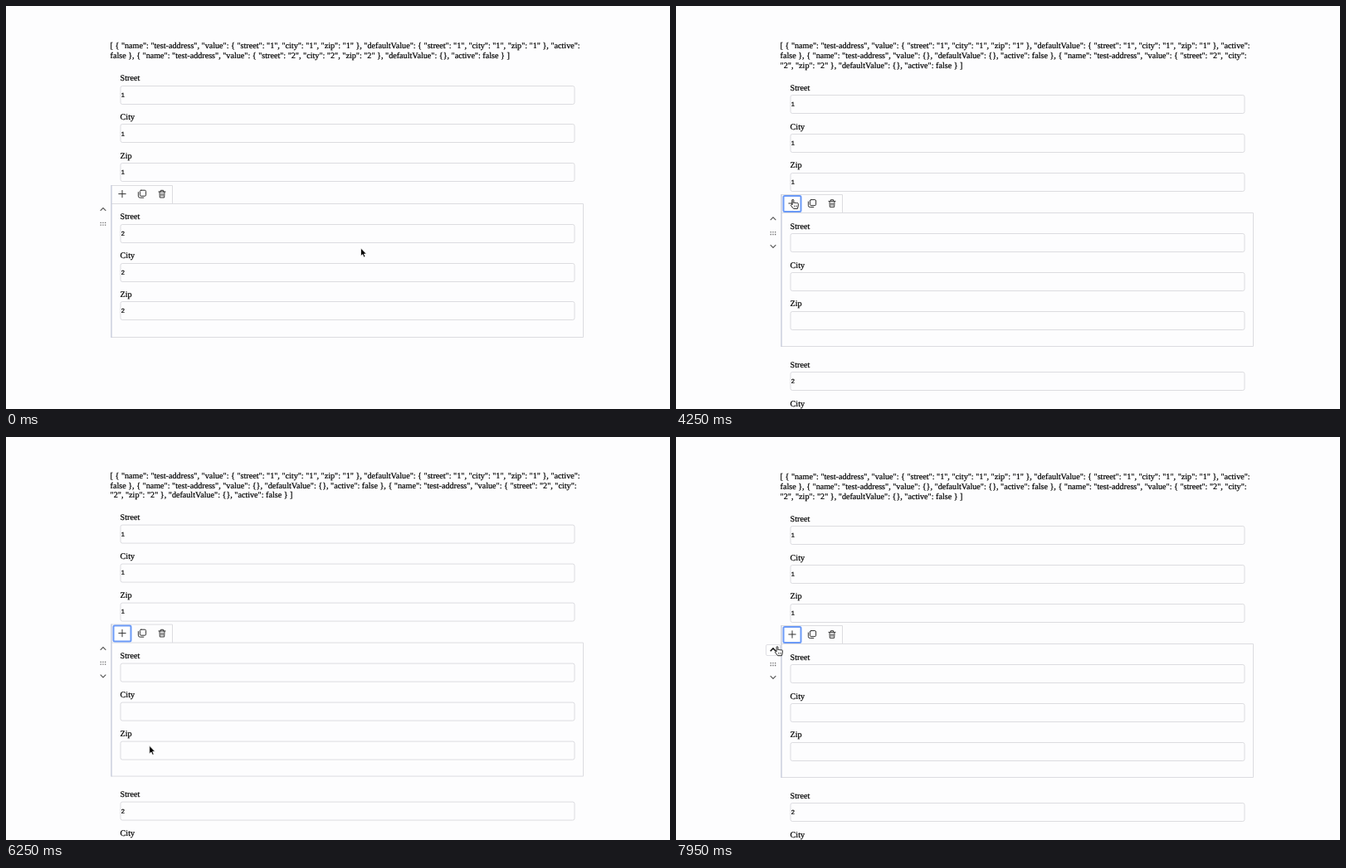
An HTML page for the animation above (8 s loop, 800 px wide and 486 px high).

```html
<!DOCTYPE html>
<html lang="en">
<head>
<meta charset="utf-8">
<title>Repeatable address form</title>
<style>
  html, body { margin: 0; width: 100%; height: 100%; overflow: hidden; background: #fdfdfe; }
  svg { display: block; width: 800px; height: 486px; }
  text { font: 10.13px "Liberation Serif", Times, serif; stroke: #000; stroke-width: .22; text-rendering: geometricPrecision; }
  .value { font: 7.5px "Liberation Sans", Arial, sans-serif; }
  .line { fill: none; stroke: #dcdce0; }
  .icon { fill: none; stroke: #333; stroke-linecap: round; stroke-linejoin: round; }
  .arrow { fill: none; stroke: #555; stroke-width: 1.1; }
  .arrow.lit { stroke: #111; stroke-width: 1.5; }
  .dots { stroke: #666; stroke-width: 1.3; stroke-dasharray: 1.3 1.4; }
  .hover { fill: #fff; stroke: #dfdfe4; }
  .focus { fill: #fff; stroke: #6b9af7; stroke-width: 2; }
</style>
</head>
<body>
<svg id="stage" viewBox="0 0 800 486"></svg>
<script>
const LOOP = 8000, STEP = 50, INSERT_AT = 3600;
const LINE_H = 11.4, FIELD_H = 46.8, BLOCK_H = 167.1;
const LEFT = 127, RIGHT = 695.5, HANDLE_X = 117;
const BUTTONS = { add: 140, copy: 164, remove: 188 };

const snap = v => Math.round(v) + 0.5;

// 0 to 1 between two times, with a soft start and end
function ramp(from, to, t) {
  const k = Math.min(1, Math.max(0, (t - from) / (to - from)));
  return k * (1 + 3 * k - 2 * k * k) / 2;
}

// Pointer glides: begin, end, and the place reached
const HOME = { x: 427.5, y: 292 };
const GLIDES = [
  { from: 50, to: 850, x: 189.5, y: 230 },
  { from: 950, to: 1150, x: 154.5, y: 230 },
  { from: 1400, to: 1550, x: 162, y: 230 },
  { from: 2300, to: 2500, x: 140, y: 229 },
  { from: 4220, to: 4800, x: 173, y: 379 },
  { from: 4800, to: 4900, x: 174, y: 364 },
  { from: 6200, to: 6400, x: 168, y: 405 },
  { from: 6400, to: 6700, x: 163, y: 273 },
  { from: 6850, to: 7300, x: 141, y: 236 },
  { from: 7500, to: 7700, x: 151, y: 254 },
  { from: 7700, to: 7950, x: 122, y: 252.7 }
];

function pointerAt(t) {
  let { x, y } = HOME;
  for (const g of GLIDES) {
    const k = ramp(g.from, g.to, t);
    x += (g.x - x) * k;
    y += (g.y - y) * k;
  }
  return { x, y };
}

const scrollAt = t => 2 * (ramp(5700, 5950, t) - ramp(6200, 6350, t));

function block(value, y) {
  return ["Street", "City", "Zip"].map((label, i) => {
    const top = y + i * FIELD_H;
    return `<text x="137.6" y="${top + 90.3}">${label}</text>
      <rect class="line" x="138" y="${snap(top + 95.6)}" width="547" height="22" rx="2.2"/>
      <text class="value" x="138.8" y="${top + 109.7}">${value}</text>`;
  }).join("");
}

function toolbar(y) {
  const at = (name, shape) => `<g class="icon" transform="translate(${BUTTONS[name]} ${y})">${shape}</g>`;
  return at("add", `<path d="M-4.2 0h8.4M0-4.2v8.4"/>`)
    + at("copy", `<rect x="-2.6" y="-4.4" width="7.2" height="7" rx="1.4"/><path d="M-4.6-2v4.6q0 2 2 2h4.4"/>`)
    + at("remove", `<path d="M-4-2.6h8M-1.6-2.6v-1.7h3.2v1.7M-3-2.6l.3 7h5.4l.3-7M-1-.4v2.8M1-.4v2.8"/>`);
}

const chevron = (y, dir, lit = "") =>
  `<path class="arrow ${lit}" d="M${HANDLE_X - 3.3} ${y + dir * 1.6}l3.3 ${-dir * 3.3} 3.3 ${dir * 3.3}"/>`;

const dotRow = y => `<path class="dots" d="M${HANDLE_X - 3.4} ${y}h6.8"/>`;

function panel(top) {
  const y = snap(top - 0.3), bar = y - 22;
  return `<path class="line" d="M${LEFT} ${bar}H200.5V${y}"/>
    <path class="line" d="M${LEFT} ${y}H${RIGHT}v161H${LEFT}"/>
    <path d="M${LEFT} ${bar - 0.5}V${y + 161.5}" stroke="#c6cadb" stroke-width="1.4"/>`;
}

function view(lines, values) {
  const shift = (lines.length - 2) * LINE_H, top = 238.1 + shift;
  const text = lines.map((s, i) => `<text x="125.6" y="${51.4 + i * 11.55}">${s}</text>`).join("");
  const blocks = values.map((v, i) => block(v, shift + i * BLOCK_H)).join("");
  const down = values.length > 2 ? chevron(top + 40.2, -1) : "";
  return {
    top,
    body: text + blocks + panel(top),
    icons: toolbar(top - 11.5) + dotRow(top + 23.2) + dotRow(top + 26) + down
  };
}

const address = n => `{ "street": "${n}", "city": "${n}", "zip": "${n}" }`;
const item = '{ "name": "test-address", "value":';
const first = `[ ${item} ${address(1)}, "defaultValue": ${address(1)}, "active":`;
const before = view([
  first,
  `false }, ${item} ${address(2)}, "defaultValue": {}, "active": false } ]`
], [1, 2]);
const after = view([
  first,
  `false }, ${item} {}, "defaultValue": {}, "active": false }, ${item} { "street": "2", "city":`,
  '"2", "zip": "2" }, "defaultValue": {}, "active": false } ]'
], [1, "", 2]);

const ARROW = `<path d="M0 0V9.6L2.2 7.6 3.7 11 5.4 10.3 3.9 7H6.8Z" stroke="#fff" stroke-width=".7"/>`;
const HAND = `<path d="M-.9 6.4V.9a.9.9 0 0 1 1.8 0V4.2${"a.95.95 0 0 1 1.8.2".repeat(3)}v3L5.4 11H.6L-2.6 7a1 1 0 0 1 1.7-.6Z"
  fill="#fff" stroke="#111" stroke-width=".9" stroke-linejoin="round"/>
  <path d="M1.5 7v2.2m1.6-2.2v2.2m1.6-2.2v2.2" stroke="#333" stroke-width=".6"/>`;

function hovered({ x, y }, top) {
  if (y > top - 21 && y < top - 0.5)
    return Object.keys(BUTTONS).find(name => Math.abs(x - BUTTONS[name]) <= 10.5);
  return Math.abs(x - HANDLE_X) < 9 && y > top && y < top + 15 ? "up" : undefined;
}

const box = (style, x, y, w, h) =>
  `<rect class="${style}" x="${x - w / 2}" y="${y}" width="${w}" height="${h}" rx="1.5"/>`;

const stage = document.getElementById("stage");

function render(t) {
  const inserted = t >= INSERT_AT;
  const { top, body, icons } = inserted ? after : before;
  const pointer = pointerAt(t), scroll = scrollAt(t);
  const over = hovered(pointer, top - scroll);

  let marks = "";
  if (over === "up") marks += box("hover", HANDLE_X, snap(top + 0.8), 17, 13);
  else if (over) marks += box("hover", BUTTONS[over], snap(top - 20.3), 19, 18);
  if (inserted) marks += box("focus", BUTTONS.add, top - 20.5, 21, 19);

  stage.innerHTML = `<g transform="translate(0 ${-scroll})">
      ${body}${marks}${icons}${chevron(top + 7.1, 1, over === "up" ? "lit" : "")}
    </g>
    <g transform="translate(${pointer.x} ${pointer.y})">${over ? HAND : ARROW}</g>`;
}

let shown = -1;
const start = performance.now();
function frame() {
  const step = Math.floor(Math.max(0, performance.now() - start) / STEP);
  if (step !== shown) render(step * STEP % LOOP);
  shown = step;
  requestAnimationFrame(frame);
}
frame();
</script>
</body>
</html>
```
